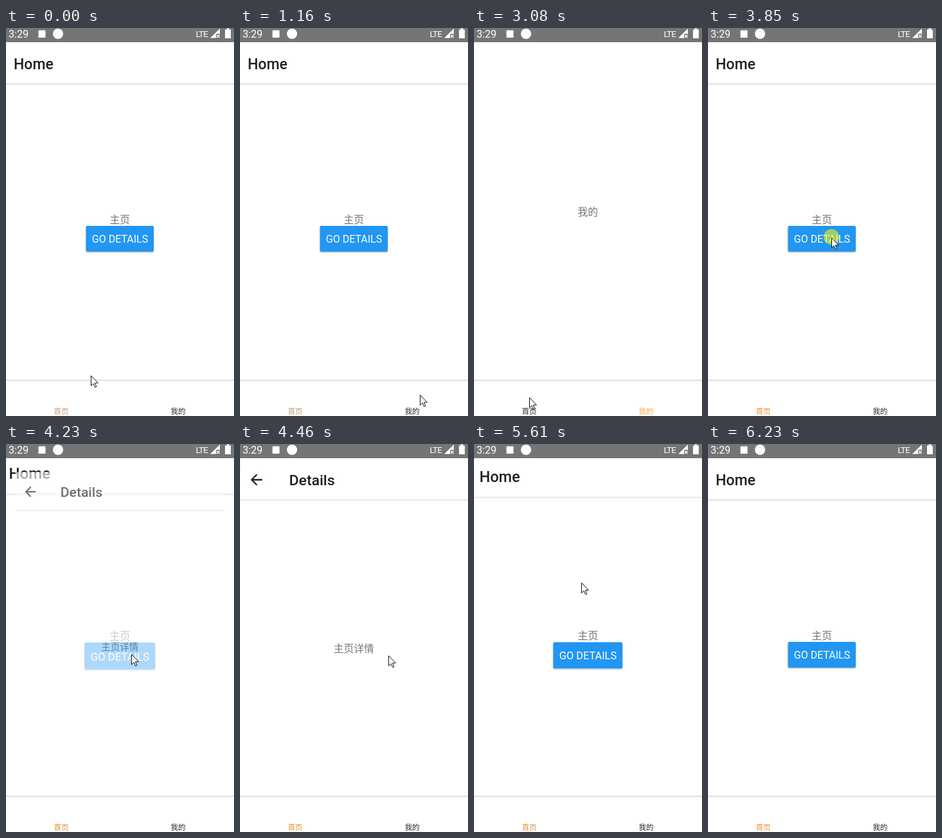
These frames come from a looping animation (355x602 px, 7.24 s). An HTML page:

```html
<!DOCTYPE html>
<html lang="zh-CN">
<head>
<meta charset="utf-8">
<title>Tab navigation</title>
<style>
  html, body { margin: 0; width: 100%; height: 100%; overflow: hidden; background: #fff; }
  svg { display: block; width: 100vw; height: 100vh; }
  text { font-family: Roboto, sans-serif; }
  .zh { font-family: "Noto Sans CJK SC", "Noto Sans CJK", sans-serif; text-anchor: middle; }
  .body { font-size: 15.8px; fill: #757575; }
  .tab { font-size: 11.6px; }
  .title { font-size: 23px; font-weight: 500; fill: #1f2022; }
</style>
</head>
<body>
<svg viewBox="0 0 355 602" preserveAspectRatio="none">
  <defs>
    <g id="header">
      <rect y="86" width="355" height="1" fill="#e0e0e0"/>
      <rect y="87" width="355" height="1" fill="#ebebeb"/>
      <rect y="88" width="355" height="1" fill="#f7f7f7"/>
    </g>
    <clipPath id="pageClip"><rect y="22" width="355" height="525"/></clipPath>
    <clipPath id="buttonClip"><rect x="124.5" y="307" width="105.5" height="40" rx="2"/></clipPath>
    <filter id="shadow" x="-10%" y="-20%" width="120%" height="150%">
      <feDropShadow dx="0" dy="1.2" stdDeviation="1.2" flood-color="#000" flood-opacity=".3"/>
    </filter>
  </defs>

  <rect width="355" height="602" fill="#fff"/>

  <g clip-path="url(#pageClip)">
    <g id="home">
      <use href="#header"/>
      <text class="title" x="12" y="63.6">Home</text>
      <text class="zh body" x="177.3" y="302.8">主页</text>
      <rect x="124.5" y="307" width="105.5" height="40" rx="2" fill="#2196f3" filter="url(#shadow)"/>
      <circle id="ripple" cx="192" cy="325" fill="#fff" clip-path="url(#buttonClip)"/>
      <text x="177.5" y="333.4" font-size="16" fill="#fff" text-anchor="middle">GO DETAILS</text>
    </g>
    <g id="details">
      <rect y="22" width="355" height="525" fill="#fff"/>
      <use href="#header"/>
      <path d="M34.6 55.3H18.6M26.2 47L18 55.3L26.2 63.6" fill="none" stroke="#222" stroke-width="2.3"/>
      <text class="title" x="76.5" y="63.6">Details</text>
      <text class="zh body" x="177.3" y="322.8">主页详情</text>
    </g>
    <g id="mine">
      <text class="zh body" x="177.3" y="291">我的</text>
    </g>
  </g>

  <rect y="545" width="355" height="1" fill="#f0f0f0"/>
  <rect y="546" width="355" height="2" fill="#e4e4e4"/>
  <text id="homeTab" class="zh tab" x="86" y="599.2">首页</text>
  <text id="mineTab" class="zh tab" x="268" y="599.2">我的</text>

  <rect width="355" height="22" fill="#757575"/>
  <g fill="#fff">
    <text x="4" y="15" font-size="16.2">3:29</text>
    <rect x="50.5" y="3.5" width="11" height="11.5" rx="1"/>
    <circle cx="81" cy="9" r="8"/>
    <text x="295.5" y="14" font-size="13.5" letter-spacing="-.9">LTE</text>
    <path d="M318 15.5L333 1V9H327V15.5Z"/>
    <path d="M328 10.5l4.6 4.6m0-4.6l-4.6 4.6" stroke="#fff" stroke-width="1.4"/>
    <path d="M341 2.5h2.5V.5h4v2h2.5v13.5h-9z"/>
  </g>

  <circle id="ring" r="12" fill="#ff0" fill-opacity=".55"/>
  <path id="cursor" d="M.5.5V16.2L4.1 12.8L6.6 18.5L8.9 17.5L6.4 11.9H11.4Z" fill="#fff" stroke="#111" stroke-width="1"/>
</svg>

<script>
const LOOP = 7240, TICK = 77;
const el = id => document.getElementById(id);
const [home, details, mine, ripple, homeTab, mineTab, ring, cursor] =
  ["home", "details", "mine", "ripple", "homeTab", "mineTab", "ring", "cursor"].map(el);

// Pointer path: tick, x, y
const path = [
  [0, 132, 539], [5, 72, 565], [8, 84, 569], [10, 84, 569], [15, 280, 569],
  [17, 280, 569], [18, 278, 568], [21, 278, 568], [22, 274, 569], [31, 274, 569],
  [39, 86, 573], [40, 86, 573], [41, 89, 571], [49, 192, 325], [54, 192, 325],
  [57, 204, 327], [58, 231, 328], [66, 28, 56], [69, 28, 56], [73, 167, 215], [80, 350, 492]
];
const clicks = [[25, 26], [39, 40], [50, 51], [67, 69]];

const clamp = v => Math.max(0, Math.min(1, v));
const show = (node, on) => node.setAttribute("visibility", on ? "visible" : "hidden");
const within = (k, [a, b]) => k >= a && k < b;

function pointer(k) {
  const i = path.findIndex(p => p[0] > k);
  if (i < 0) return path[path.length - 1].slice(1);
  const [a, x, y] = path[i - 1], [b, x2, y2] = path[i];
  const u = (k - a) / (b - a);
  const e = b < 69 ? u * u * (3 - 2 * u) : u;
  return [x + (x2 - x) * e, y + (y2 - y) * e];
}

function zoom(node, s) {
  node.setAttribute("transform", `translate(177.5 285) scale(${s}) translate(-177.5 -285)`);
}

function draw(time) {
  const k = Math.floor((time + 10) / TICK);
  const onMine = within(k, [26, 41]);

  // Stack depth: 0 is Home, 1 is Details
  const closing = k >= 69;
  const depth = closing ? Math.pow(1 - clamp((k - 69) / 6), 1.4)
                        : 1 - Math.pow(1 - clamp((k - 54) / 4.5), 2.4);
  const fade = closing ? clamp((depth - .4) / .6) : clamp(depth * 1.4);
  show(home, !onMine && (depth < 1 || fade < 1));
  show(details, fade > 0);
  show(mine, onMine);
  zoom(home, 1 + .1 * depth);
  zoom(details, closing ? .9 + .1 * depth : .85 + .15 * depth);
  details.setAttribute("opacity", fade);

  const press = k - 50;
  ripple.setAttribute("r", 28 * clamp(press / 3) + 12);
  ripple.setAttribute("opacity", press > 0 && press < 3 ? .22 - .06 * press : 0);

  const active = k < 26 ? "#c49b78" : onMine ? "#eda951" : "#df9136";
  homeTab.setAttribute("fill", onMine ? "#2b2b2b" : active);
  mineTab.setAttribute("fill", onMine ? active : "#2b2b2b");

  const [x, y] = pointer(k);
  cursor.setAttribute("transform", `translate(${Math.round(x)} ${Math.round(y)})`);
  show(cursor, k < 81);
  ring.setAttribute("cx", x);
  ring.setAttribute("cy", y - 1);
  show(ring, clicks.some(c => within(k, c)));
}

const start = performance.now();
function loop() {
  draw((performance.now() - start) % LOOP);
  requestAnimationFrame(loop);
}
loop();
</script>
</body>
</html>
```
